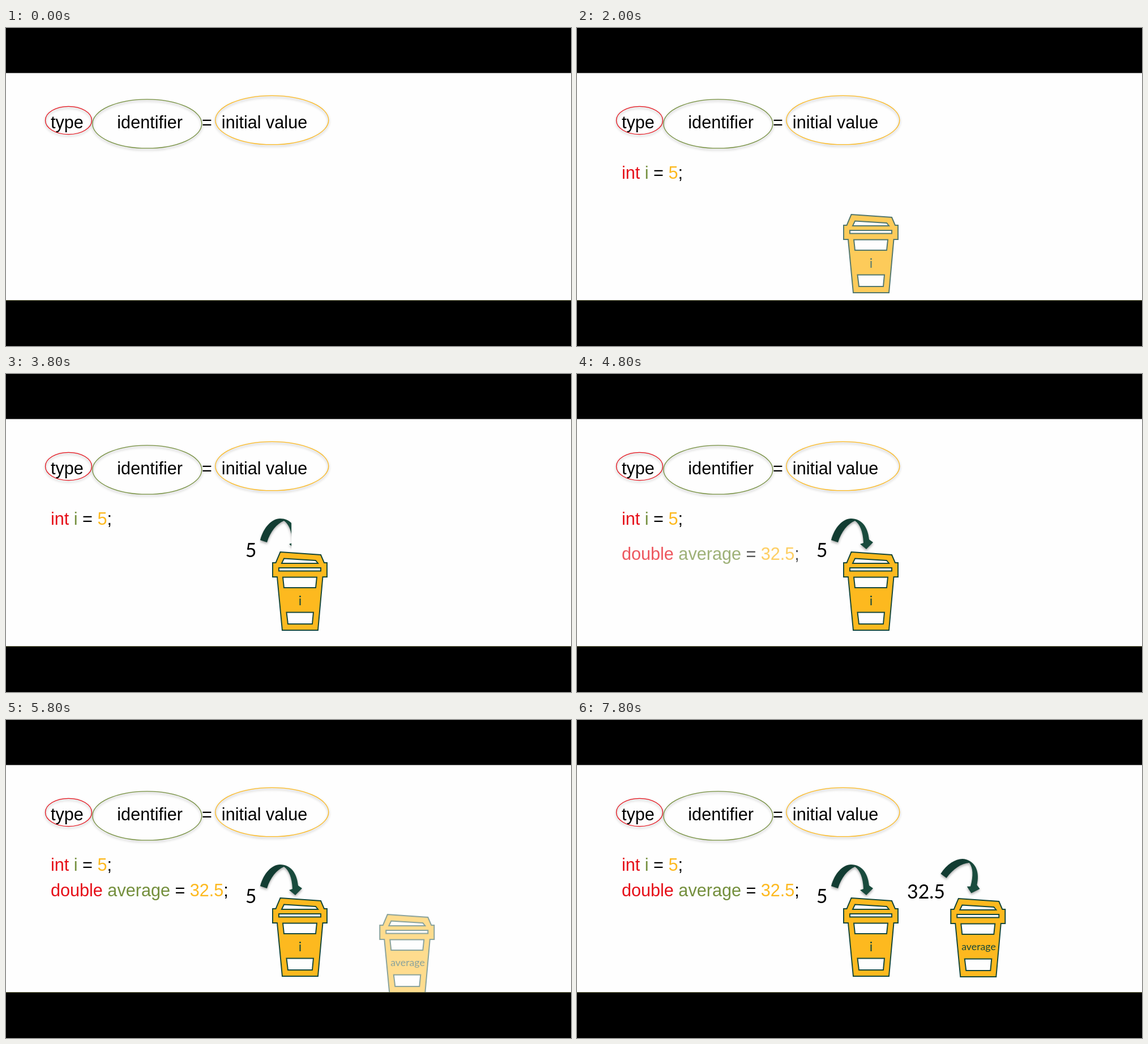
Write an HTML page with a canvas that moves like this. It is 998 px wide and 561 px high and loops after 8000 ms.

```html
<!DOCTYPE html>
<html lang="en">
<head>
<meta charset="utf-8">
<title>Variable declarations</title>
<style>
  html, body { margin: 0; width: 100%; height: 100%; overflow: hidden; background: #000; }
  canvas { display: block; }
</style>
</head>
<body>
<canvas id="stage" width="998" height="561"></canvas>
<script>
const W = 998, H = 561, LOOP = 8000, STEP = 200;
const RISE = H * 0.1, RISE_MS = 750, FADE_MS = 500, WIPE_MS = 500;
const RED = '#e60f19', GREEN = '#748f3d', GOLD = '#fdb91f', DARK = '#17483a', INK = '#000';
const CODE_FONT = '30.6px "Liberation Sans", Arial, sans-serif';

const stage = document.getElementById('stage').getContext('2d');
const buffer = document.createElement('canvas');
buffer.width = W;
buffer.height = H;
const layer = buffer.getContext('2d');

const progress = (t, start, ms) => Math.min(1, Math.max(0, (t - start) / ms));

function shadow(c, alpha) {
  c.shadowColor = `rgba(0,0,0,${alpha})`;
  c.shadowBlur = 4;
  c.shadowOffsetY = 2.5;
}

// Draws a group on its own layer so that it fades as one piece.
function group(alpha, dy, draw) {
  if (alpha <= 0) return;
  layer.clearRect(0, 0, W, H);
  layer.save();
  draw(layer);
  layer.restore();
  stage.save();
  stage.globalAlpha = alpha;
  stage.drawImage(buffer, 0, dy);
  stage.restore();
}

function floatIn(t, start, draw) {
  const p = progress(t, start, RISE_MS);
  group(p, RISE * (1 - p), draw);
}

function wipeIn(t, start, left, right, draw) {
  const p = progress(t, start, WIPE_MS);
  group(p > 0 ? 1 : 0, 0, c => {
    c.beginPath();
    c.rect(left, 0, (right - left) * p, H);
    c.clip();
    draw(c);
  });
}

// Coloured runs of one line of code.
function codeLine(c, y, runs) {
  c.font = CODE_FONT;
  c.fontKerning = 'none';
  c.textAlign = 'left';
  let x = 79;
  for (const [text, color] of runs) {
    c.fillStyle = color;
    c.fillText(text, x, y);
    x += c.measureText(text).width;
  }
}

function label(c, text, x, y, size, color) {
  c.font = `${size}px Lato, Carlito, sans-serif`;
  c.textAlign = 'center';
  c.fillStyle = color;
  c.fillText(text, x, y);
}

function ring(x, y, rx, ry, color) {
  stage.save();
  shadow(stage, 0.35);
  stage.strokeStyle = color;
  stage.lineWidth = 1.3;
  stage.beginPath();
  stage.ellipse(x, y, rx, ry, 0, 0, Math.PI * 2);
  stage.stroke();
  stage.restore();
}

function polygon(c, points, fill) {
  c.beginPath();
  for (let i = 0; i < points.length; i += 2) c.lineTo(points[i], points[i + 1]);
  c.closePath();
  c.fillStyle = fill;
  c.fill();
  c.stroke();
}

const CUP = [484.5, 314, 556, 319, 562, 333, 567, 333, 567, 358, 559.5, 358,
  551, 452, 488, 452, 479, 358, 471, 358, 471, 333, 476.5, 333];
const WINDOWS = [
  [491, 325.5, 547, 329, 551, 334, 487, 334],
  [482, 342, 556, 342, 556, 347.5, 482, 347.5],
  [489, 358.5, 549, 358.5, 547, 377, 491, 377],
  [495.5, 420.5, 543, 420.5, 541, 441, 498, 441]
];

function cup(c, dx, dy) {
  c.save();
  c.translate(dx, dy);
  c.strokeStyle = DARK;
  c.lineWidth = 2;
  polygon(c, CUP, GOLD);
  for (const pane of WINDOWS) polygon(c, pane, '#fefefe');
  c.restore();
}

// Curved arrow with its tail centred at the given point.
const ARROW = new Path2D('M-6 -2 C0 -25 15 -40 29 -40 C48 -40 59 -25 61 -3 L68 2 ' +
  'L56 14 L45 5 L51 3 C50 -17 45 -30 36 -36 C23 -31 12 -17 6 2 Z');

function arrow(c, x, y, turn) {
  c.save();
  c.translate(x, y);
  c.rotate(turn * Math.PI / 180);
  const shade = c.createLinearGradient(24, 0, 46, 0);
  shade.addColorStop(0, '#123c32');
  shade.addColorStop(1, '#194b3d');
  c.fillStyle = shade;
  shadow(c, 0.35);
  c.fill(ARROW);
  c.restore();
}

function render(t) {
  stage.fillStyle = '#fefefe';
  stage.fillRect(0, 0, W, H);

  ring(110.5, 163, 41, 24.7, RED);
  ring(249.3, 169, 96.5, 43.2, GREEN);
  ring(469.8, 162.5, 100, 43.2, GOLD);
  codeLine(stage, 177, [['type       identifier    =  initial value', INK]]);

  group(progress(t, 100, FADE_MS), 0, c => codeLine(c, 266,
    [['int ', RED], ['i ', GREEN], ['= ', INK], ['5', GOLD], [';', INK]]));
  floatIn(t, 1450, c => {
    cup(c, 0, 0);
    label(c, 'i', 519.5, 408, 23, DARK);
  });
  floatIn(t, 2640, c => label(c, '5', 432.5, 323, 34, INK));
  wipeIn(t, 3440, 448, 526, c => arrow(c, 455, 295, 0));

  floatIn(t, 4275, c => codeLine(c, 310.5,
    [['double ', RED], ['average ', GREEN], ['= ', INK], ['32.5', GOLD], [';', INK]]));
  floatIn(t, 5425, c => {
    cup(c, 189.3, 1);
    label(c, 'average', 709.5, 406, 17.8, DARK);
  });
  floatIn(t, 6173, c => label(c, '32.5', 616.5, 314.5, 34, INK));
  wipeIn(t, 7170, 641, 715, c => arrow(c, 647.5, 275, 18));

  stage.fillStyle = '#000';
  stage.fillRect(0, 0, W, 79);
  stage.fillRect(0, 481, W, 80);
  stage.fillStyle = '#8c8c8c';
  stage.fillRect(0, 79, W, 1);
  stage.fillStyle = '#5c5e38';
  stage.fillRect(0, 480, W, 1);
}

function tick() {
  const t = performance.now() % LOOP;
  render(Math.floor(t / STEP) * STEP);
  requestAnimationFrame(tick);
}
tick();
</script>
</body>
</html>
```
